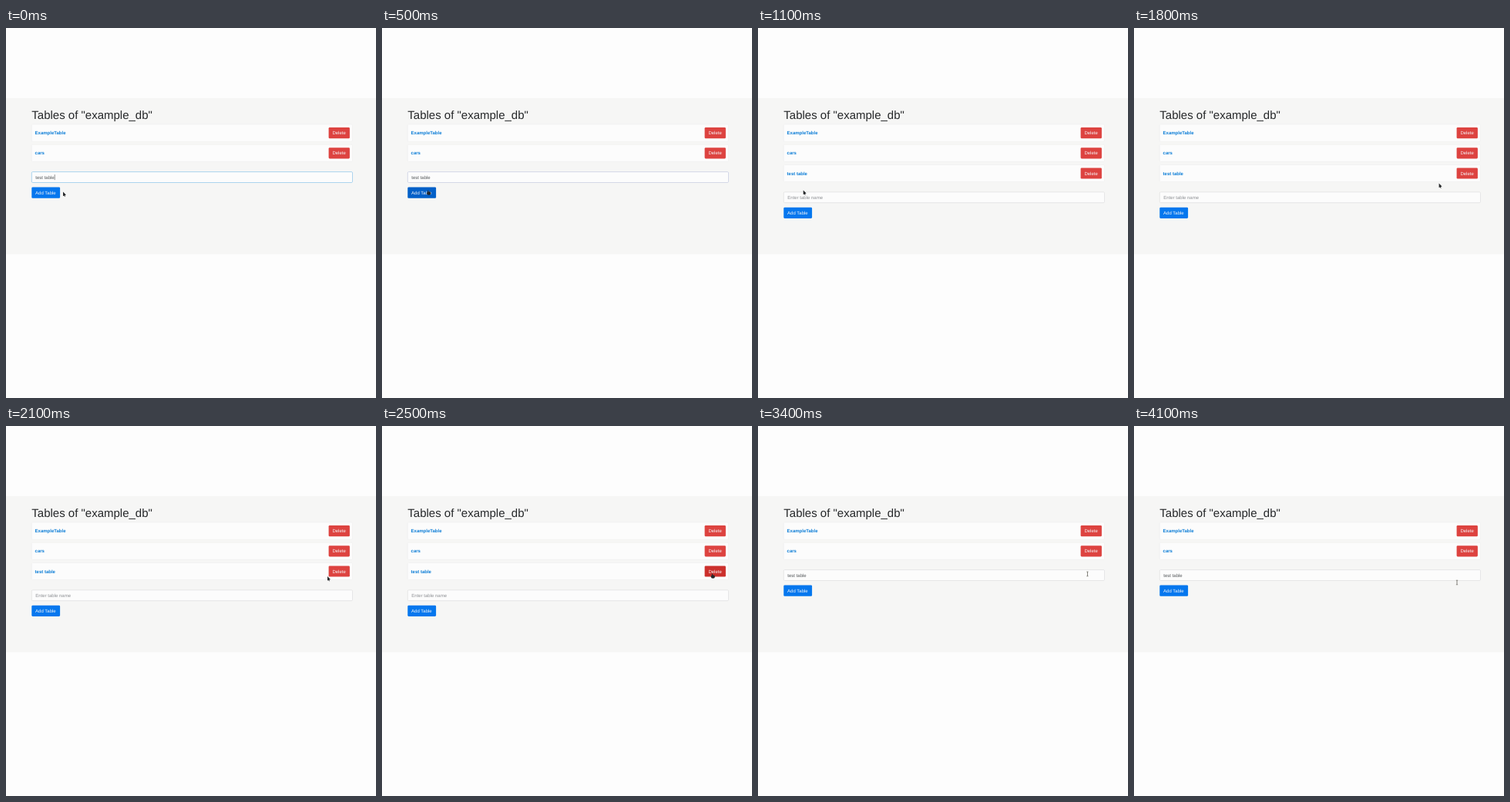
These frames come from a looping animation (480 px wide and 480 px high, 4200 ms). An HTML page with a canvas:

```html
<!DOCTYPE html>
<html lang="en">
<head>
<meta charset="utf-8">
<title>Table list</title>
<style>
  html, body { margin: 0; width: 100%; height: 100%; overflow: hidden; background: #fdfdfd; }
  canvas { display: block; }
</style>
</head>
<body>
<canvas id="stage" width="480" height="480"></canvas>
<script>
const ctx = document.getElementById('stage').getContext('2d');
const LOOP = 4200, STEP = 100;
const LEFT = 33.3, WIDTH = 416.2, TOP = 125, ROW = 26.2, BUTTON = 14.2;
const BLUR = 400, ADD = 600, REMOVE = 3100;
const INK = '#26282a';

// Places the pointer rests at or turns at
const stops = [
  { t: 0, x: 74, y: 212.5 },
  { t: 400, x: 60, y: 210.5 },
  { t: 1200, x: 58.7, y: 210.5 },
  { t: 1800, x: 395.6, y: 201.5 },
  { t: 2300, x: 428.6, y: 191.5 },
  { t: 3600, x: 427.3, y: 192 },
  { t: LOOP - STEP, x: 419, y: 203 }
];

const ease = p => p * p * (3 - 2 * p);
const mix = (a, b, p) => a + (b - a) * p;

function pointerAt(t) {
  const next = Math.max(1, stops.findIndex(s => s.t >= t));
  const a = stops[next - 1], b = stops[next];
  const p = ease((t - a.t) / (b.t - a.t));
  return { x: mix(a.x, b.x, p), y: mix(a.y, b.y, p) };
}

function box(x, y, w, h, fill, stroke) {
  ctx.beginPath();
  ctx.roundRect(x, y, w, h, 1.3);
  ctx.fillStyle = fill;
  ctx.fill();
  if (!stroke) return;
  ctx.strokeStyle = stroke;
  ctx.lineWidth = 0.7;
  ctx.stroke();
}

function label(text, x, y, color, size = 6, weight = 'normal') {
  ctx.font = `${weight} ${size}px "Liberation Sans", Arial, sans-serif`;
  ctx.fillStyle = color;
  ctx.fillText(text, x, y);
}

function button(text, x, y, w, color) {
  box(x, y, w, BUTTON, color);
  label(text, x + 4.8, y + 9.2, '#f6f6f8');
}

function tableRow(name, index, hover) {
  const y = TOP + index * ROW;
  box(LEFT, y, WIDTH, 22.2, '#fcfcfc', '#f0f0f0');
  label(name, LEFT + 4.3, y + 13.2, '#0a7cd6', 6, 'bold');
  button('Delete', 418.6, y + 4, 27.3, hover ? '#cc302c' : '#dd4340');
}

function input(y, text, color, focused, border) {
  box(LEFT, y, WIDTH, BUTTON - 0.3, '#fcfcfc', border);
  label(text, LEFT + 5, y + 9.1, color);
  if (focused) {
    const end = LEFT + 5 + ctx.measureText(text).width;
    ctx.fillStyle = INK;
    ctx.fillRect(end + 0.2, y + 3.5, 0.5, 7);
  }
}

const pointers = {
  arrow(x, y) {
    ctx.beginPath();
    ctx.moveTo(x, y);
    ctx.lineTo(x, y + 5.4);
    ctx.lineTo(x + 3.9, y + 4);
    ctx.fill();
    ctx.beginPath();
    ctx.moveTo(x + 1, y + 3);
    ctx.lineTo(x + 2.5, y + 6.2);
    ctx.stroke();
  },
  hand(x, y) {
    ctx.fillRect(x - 0.6, y, 1, 4);
    ctx.beginPath();
    ctx.ellipse(x + 0.8, y + 4, 2.6, 2.2, 0, 0, Math.PI * 2);
    ctx.fill();
  },
  beam(x, y) {
    ctx.fillRect(x - 0.4, y - 3, 0.8, 6);
    for (const end of [-3.2, 2.6]) ctx.fillRect(x - 1.2, y + end, 2.4, 0.6);
  }
};

function draw(t) {
  const pointer = pointerAt(t);
  const added = t >= ADD && t < REMOVE;
  const focused = t < BLUR;
  const shift = added ? ROW : 0;
  const onAdd = t < ADD && pointer.x < LEFT + 36.8;
  const onDelete = added && pointer.x > 418.6 && pointer.y < TOP + 3 * ROW - 8;

  ctx.fillStyle = '#fdfdfd';
  ctx.fillRect(0, 0, 480, 480);
  ctx.fillStyle = '#f6f6f5';
  ctx.fillRect(0, 91, 480, 202.5);

  label('Tables of "example_db"', LEFT, 118, INK, 15);
  const names = ['ExampleTable', 'cars'];
  if (added) names.push('test table');
  names.forEach((name, i) => tableRow(name, i, i === 2 && onDelete));

  const border = focused ? '#8cc4ea' : t < ADD ? '#c4cae0' : '#dedee0';
  input(186.6 + shift, added ? 'Enter table name' : 'test table',
        added ? '#8e9094' : '#55595c', focused, border);
  button('Add Table', LEFT, 206.5 + shift, 36.8, onAdd ? '#0260c8' : '#0577ee');

  const kind = onAdd || onDelete ? 'hand' : t >= REMOVE ? 'beam' : 'arrow';
  ctx.fillStyle = ctx.strokeStyle = kind === 'beam' ? '#66645c' : INK;
  ctx.lineWidth = 1;
  pointers[kind](pointer.x, pointer.y);
}

ctx.textRendering = 'geometricPrecision';
const start = performance.now();
function tick() {
  const t = Math.floor(((performance.now() - start) % LOOP) / STEP) * STEP;
  draw(Math.min(t, LOOP - STEP));
  requestAnimationFrame(tick);
}
tick();
</script>
</body>
</html>
```
